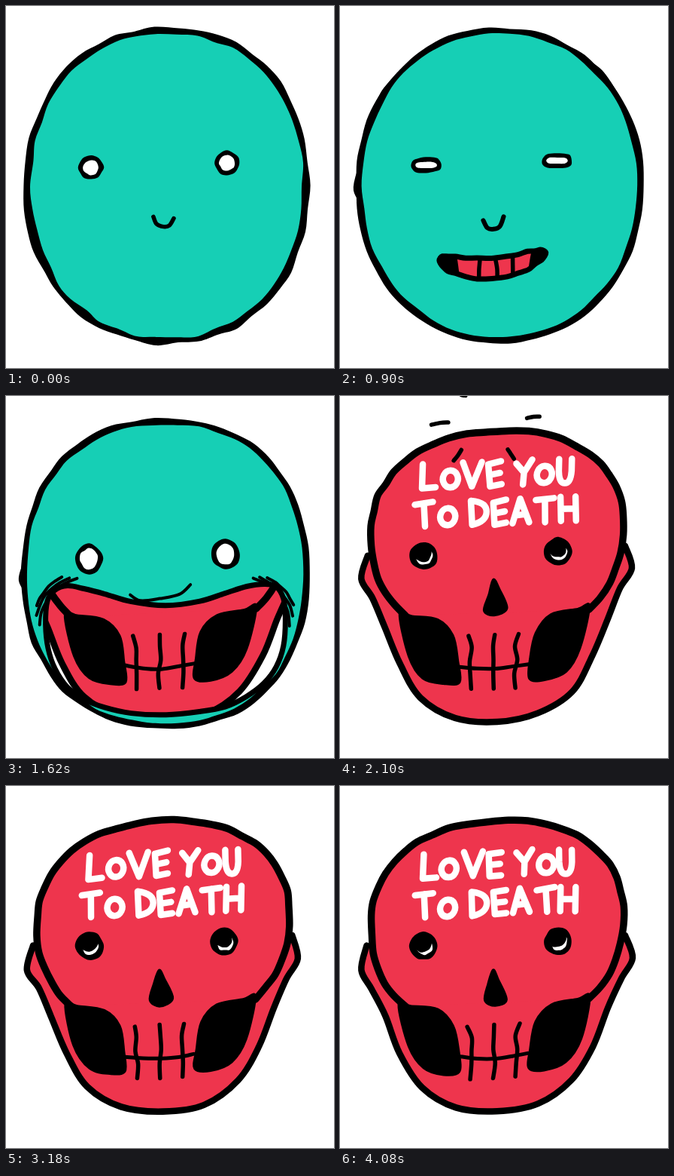
An HTML page with a canvas that plays this animation: 436 by 480 pixels, repeating every 4140 ms.

```html
<!DOCTYPE html>
<html lang="en">
<head>
<meta charset="utf-8">
<title>Love you to death</title>
<style>
  html, body { margin: 0; width: 100%; height: 100%; overflow: hidden; background: #fff; }
  canvas { display: block; width: 436px; height: 480px; }
</style>
</head>
<body>
<canvas width="436" height="480" role="img" aria-label="Love you to death"></canvas>
<script>
const ctx = document.querySelector('canvas').getContext('2d');
const STEP = 60, FRAMES = 69, PI = Math.PI;
const TEAL = '#16cfb5', RED = '#ee354d';

let seed = 1;
const rand = () => (seed = seed * 16807 % 2147483647) / 2147483647;
const wobble = amp => (rand() * 2 - 1) * amp;

// Eased blend between [time, ...values] stops
function key(t, ...stops) {
  const next = stops.findIndex(s => s[0] > t);
  if (next < 1) return (next ? stops[stops.length - 1] : stops[0]).slice(1);
  const a = stops[next - 1], b = stops[next];
  const u = (t - a[0]) / (b[0] - a[0]), ease = u * u * (3 - 2 * u);
  return a.map((v, i) => v + (b[i] - v) * ease).slice(1);
}

// Superellipse arc; low is the radius below the centre, e the squareness
function ring(x, y, rx, ry, { e = 2, low = ry, from = PI, to = 3 * PI, n = 12 } = {}) {
  const closed = to - from >= 2 * PI;
  const bend = v => Math.sign(v) * Math.abs(v) ** (2 / e);
  return Array.from({ length: n }, (_, i) => {
    const a = from + (to - from) * i / (closed ? n : n - 1);
    const s = bend(Math.sin(a));
    return [x + rx * bend(Math.cos(a)), y + s * (s > 0 ? low : ry)];
  });
}

const mirror = (points, axis) => points.map(([x, y]) => [2 * axis - x, y]);

// Hand-drawn curve through the points
function trace(points, { closed = false, amp = 1 } = {}) {
  const p = points.map(([x, y]) => [x + wobble(amp), y + wobble(amp)]);
  const path = new Path2D(), n = p.length;
  const at = i => closed ? p[(i + n) % n] : p[Math.max(0, Math.min(n - 1, i))];
  path.moveTo(...p[0]);
  for (let i = 0; i < (closed ? n : n - 1); i++) {
    const [a, b, c, d] = [at(i - 1), at(i), at(i + 1), at(i + 2)];
    path.bezierCurveTo(b[0] + (c[0] - a[0]) / 6, b[1] + (c[1] - a[1]) / 6,
      c[0] - (d[0] - b[0]) / 6, c[1] - (d[1] - b[1]) / 6, c[0], c[1]);
  }
  if (closed) path.closePath();
  return path;
}

function fill(path, color = '#000') { ctx.fillStyle = color; ctx.fill(path); }
function stroke(path, width, color = '#000') {
  ctx.lineWidth = width;
  ctx.strokeStyle = color;
  ctx.stroke(path);
}

// Brush letters in a unit box, with their widths in pixels
const GLYPHS = {
  L: [18, 'M.05 0 0 1 1 .95'],
  O: [20, 'M.5 .3A.5 .35 0 1 0 .51 .3Z'],
  V: [25, 'M0 0 .48 1 1 0'],
  E: [17, 'M1 0 0 .08 .1 1 1 .95M.05 .53 .9 .48'],
  Y: [21, 'M0 .1 .5 .5 1 0M.5 .5 .45 1'],
  U: [17, 'M0 0V.5Q.05 1 .5 1T1 .5V0'],
  T: [24, 'M0 .08 1 0M.5 .04 .55 1'],
  D: [21, 'M.1 1 0 0Q1 .1 1 .5T.1 1Z'],
  A: [22, 'M0 1 .45 0 1 1M.2 .68 .8 .65'],
  H: [20, 'M0 0V1M1 0V1M0 .5H1']
};

function letter(text, x, y, gap) {
  for (const char of text) {
    if (char === ' ') { x += 12; continue; }
    const [width, shape] = GLYPHS[char];
    const path = new Path2D();
    path.addPath(new Path2D(shape), {
      a: width, b: wobble(1.2), c: wobble(1.2), d: 32, e: x + wobble(1), f: y + wobble(1.2)
    });
    stroke(path, 8.5, '#fff');
    x += width + gap;
  }
}

const HALF_JAW = [[36,205], [28,236], [43,262], [60,300], [80,350], [108,395], [153,424]];
const JAW = [...HALF_JAW, [208,432], ...mirror(HALF_JAW, 208).reverse()];
const CRANIUM = ring(209, 178, 168, 132, { e: 2.2, low: 150, from: .75 * PI, to: 2.25 * PI, n: 34 });
const HOLLOW = [[78,284], [95,287], [130,293], [151,315], [158,350], [159,377], [138,380], [110,370], [90,340]];
const NOSE = [[204,243], [211,256], [221,283], [206,291], [192,284], [197,262]];

function drawSkull(t) {
  const [middle, gap, broad] = key(t, [1020, 208, 22, 1.035], [1560, 204, 30, 1.035], [1680, 204, 30, 1.035], [2040, 204, 30, 1]);
  ctx.save();
  ctx.transform(1, -.04, 0, 1, 0, .04 * 208);
  const jaw = JAW.map(([x, y]) => [208 + (x - 208) * broad, y]);
  for (const [shape, width] of [[jaw, 8.5], [CRANIUM, 9.5]]) {
    const path = trace(shape, { amp: 1.2 });
    fill(path, RED);
    stroke(path, width);
  }
  for (const hollow of [HOLLOW, mirror(HOLLOW, 205)]) {
    const path = trace(hollow, { closed: true });
    fill(path);
    stroke(path, 2);
  }
  stroke(trace([[157,356], [182,360], [207,362], [230,360], [250,357]]), 5);
  for (const side of [-1, 0, 1]) {
    const x = middle + side * gap;
    const tooth = [317, 332, 350, 368, 387].map((y, i) => [x + side * (i ? 0 : 3) + wobble(1.5), y]);
    stroke(trace(tooth), 5.5);
  }
  if (t > 1680) {
    const nose = trace(NOSE, { closed: true });
    fill(nose);
    stroke(nose, 3);
    letter('LOVE YOU', 110, 87, 8);
    letter('TO DEATH', 100, 138, 9);
  }
  ctx.restore();
}

// An oval whose upper and lower lips bend up towards the corners
function lips(x, y, rx, ry, upper, lower, tilt) {
  return ring(0, 0, 1, 1, { e: 2.4, n: 28 }).map(([u, v]) => {
    const bend = lower + (upper - lower) * (1 - v) / 2;
    return [x + rx * u, y + ry * v - bend * u * u + tilt * u];
  });
}

function drawCreases(t) {
  const [x, half, y, depth, tilt, width] = key(t, [540, 209, 13.5, 280, 12, 1, 5.5],
    [840, 204, 13, 282, 14, -2, 6], [1080, 204, 13, 282, 14, -2, 6], [1560, 205, 40, 257, 12, -7, 4]);
  const crease = [-1, -.65, 0, .65, 1].map(u => [x + half * u, y + depth * (1 - Math.abs(u) ** 4) + tilt * u]);
  stroke(trace(crease, { amp: .7 }), width);

  if (t < 1320 || t >= 1860) return;
  const [ink] = key(t, [1260, 0], [1560, 4]);
  for (let i = 0; i < 3; i++) {
    const fold = ring(110, 304, 75 - 5 * i, 72 - 4 * i, { from: PI * (1.12 - .06 * i), to: PI * (1.34 + .04 * i), n: 6 });
    stroke(trace(fold), ink);
    stroke(trace(mirror(fold, 211)), ink);
  }
}

function drawSkin(t) {
  const [lift] = key(t, [1860, 0], [2040, -170]);
  const [x, y, rx, ry, e, rim, amp] = key(t, [0, 214, 238, 190, 210.5, 2.13, 9, 2.1],
    [900, 212, 238, 191.5, 209, 2.1, 9, 1.3], [1620, 212, 235.5, 191.5, 205.5, 2.25, 8.5, 1.3],
    [1860, 207.5, 226, 205, 207, 2.2, 9, 1.3]);
  const head = trace(ring(x, y, rx, ry, { e, n: 46 }), { closed: true, amp });
  const face = trace(ring(x, y, rx - rim, ry - rim + 1, { e, n: 46 }), { closed: true, amp });
  const mouth = t >= 600 && trace(lips(...key(t, [540, 204, 342, 14, 2, 0, 0, 0],
    [840, 202, 348, 71, 14, 16, 16, -5], [1020, 202, 348, 71, 14, 16, 16, -5],
    [1560, 212, 350, 160, 72, 90, 10, -2], [1650, 212, 350, 160, 72, 90, 10, -2],
    [1920, 210, 262, 218, 214, 0, 0, 0])), { closed: true });

  ctx.save();
  ctx.translate(0, lift);
  ctx.save();
  if (mouth) {
    const mask = new Path2D();
    mask.rect(-50, -50, 536, 780);
    mask.addPath(mouth);
    ctx.clip(mask, 'evenodd');
  }
  fill(head);
  fill(face, TEAL);
  drawCreases(t);
  ctx.restore();
  if (mouth) {
    ctx.clip(head);
    stroke(mouth, 7);
  }
  ctx.restore();
}

function drawEyes(t) {
  const squint = [114.5, 211, 174, 20, 10, 5.7, 2.8], wide = [110, 216, 182, 18.5, 20, 6.5, 2];
  const [left, y, gap, rx, ry, rim, e] = key(t, [540, 113, 214, 181, 16.5, 16, 6, 2],
    [780, ...squint], [1020, ...squint], [1260, ...wide], [1680, ...wide],
    [1920, 111, 212, 179, 18.5, 18.5, 7.5, 2]);
  const [lid] = key(t, [1680, 0], [1920, 1]);
  const oval = (x, y, rx, ry, color) =>
    fill(trace(ring(x, y, rx, ry, { e }), { closed: true, amp: Math.min(.9, ry / 12) }), color);

  for (const [x, top] of [[left, y], [left + gap, y - 6]]) {
    oval(x, top, rx, ry, '#000');
    oval(x + lid, top + lid, rx - rim, ry - rim, '#fff');
    if (lid) oval(x - 1, top - 16 + 12 * lid, 12 * lid, 12 * lid, '#000');
  }
}

// Flicks left behind as the skin flies off: centre, slope, length
function drawSnap(t) {
  const flicks = [[133, 36, -.14, 22], [257, 28, -.1, 17], [164, -1, 0, 6], [156, 79, -.95, 17], [227, 77, .95, 14]];
  const drop = t < 2100 ? 20 : 0;
  for (const [x, y, slope, length] of flicks) {
    const dx = Math.cos(slope) * length / 2, dy = Math.sin(slope) * length / 2;
    stroke(trace([[x - dx, y - dy + drop], [x, y + drop], [x + dx, y + dy + drop]], { amp: .6 }), 5.5);
  }
}

function draw(frame) {
  const t = frame * STEP;
  seed = frame * 7919 + 4177;
  for (let i = 0; i < 4; i++) rand();
  ctx.fillStyle = '#fff';
  ctx.fillRect(0, 0, 436, 480);
  ctx.lineCap = ctx.lineJoin = 'round';
  if (t >= 600) drawSkull(t);
  if (t < 2040) drawSkin(t);
  drawEyes(t);
  if (t >= 2040 && t < 2160) drawSnap(t);
}

let shown = -1;
function tick() {
  const frame = Math.floor(performance.now() / STEP) % FRAMES;
  if (frame !== shown) draw(shown = frame);
  requestAnimationFrame(tick);
}
tick();
</script>
</body>
</html>
```
